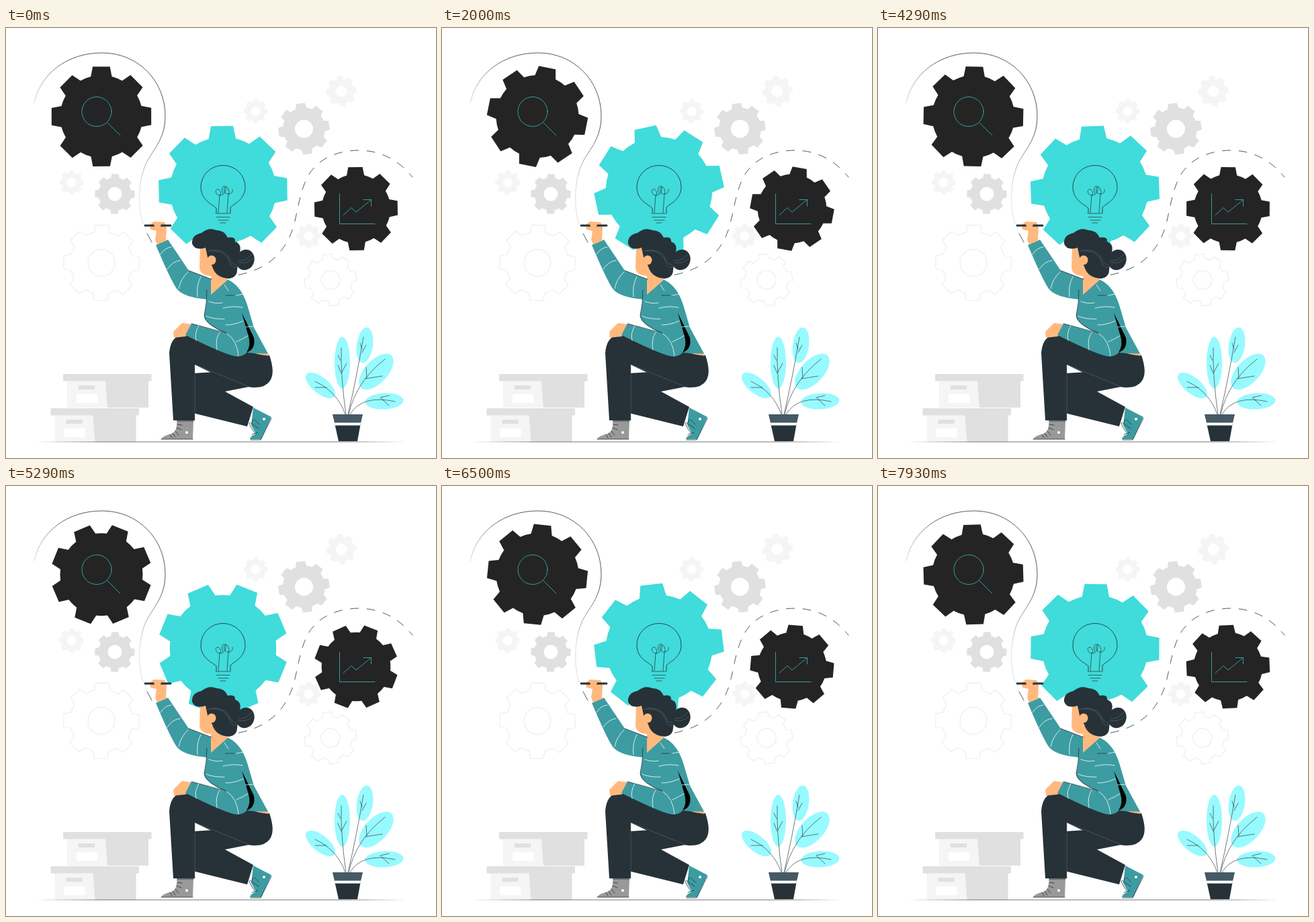
These frames come from a looping animation (640x640 px, 8 s). An HTML page:

```html
<!DOCTYPE html>
<html lang="en">
<head>
<meta charset="utf-8">
<title>Turning gears</title>
<style>
  html, body { margin: 0; width: 100%; height: 100%; overflow: hidden; background: #fff; }
  svg { display: block; width: 100%; height: 100%; }
  .line { fill: none; stroke: #263238; stroke-width: .8; stroke-linecap: round; stroke-linejoin: round; }
  .thin { stroke-width: .65; }
  .cyan { stroke: #40dbdb; }
  .white { stroke: #fff; }
  .dark { fill: #263238; }
  .shirt { fill: #3c9ca2; }
  .skin { fill: #ffb97f; }
  .pale { fill: #f5f5f5; }
  .grey { fill: #e0e0e0; }
  .leaf { fill: #97faff; }
</style>
</head>
<body>
<svg viewBox="0 0 640 640">
  <defs>
    <linearGradient id="fade" gradientUnits="userSpaceOnUse" x1="42" y1="112" x2="95" y2="45">
      <stop offset="0" stop-color="#263238" stop-opacity=".2"/>
      <stop offset="1" stop-color="#263238"/>
    </linearGradient>
  </defs>
  <g id="backGears"></g>
  <g id="gears"></g>

  <!-- icons -->
  <g class="line thin cyan">
    <circle cx="135" cy="124.500" r="22"/>
    <path d="M151 141L170 160M496.500 247V291.500H549M502 278.500L514 267.500L521 274L543 256M532 255.500H543.500V265"/>
  </g>
  <g class="line" style="stroke:#242424">
    <path d="M313 275V268C306 262 290 256 290 236.500A33 32 0 0 1 356 236.500C356 255 340 261 334 267V275"/>
    <path class="thin" d="M312 276H334M313 281.500H333M316 286H331M319 290H327"/>
    <path class="thin" d="M316 275L318 249C311 248 311 240 315 240C320 240 321 249 318 249C325 249 328 243 327 237C324 232 319 239 323 246M329 275L331 247C324 248 323 237 327 236C332 237 333 247 331 247C336 247 338 243 337 240"/>
  </g>

  <!-- drawn path -->
  <path class="line" style="stroke:url(#fade)" d="M42 112C51 67 92 37 143 37C197 37 237 79 237 131C237 168 216 183 207 205C197 230 196 267 204 292"/>
  <path class="line" d="M210 306L217 319"/>
  <path class="line" stroke-dasharray="12 12.500" stroke-dashoffset="5" d="M605 222C584 196 558 183 527 182C495 182 465 193 449 221C437 245 435 269 428 295C414 341 382 361 343 368"/>

  <!-- boxes -->
  <g id="boxes"></g>
  <path d="M43 616L140 615.400H500L597 616L500 616.600H140Z" fill="#777"/>

  <!-- plant -->
  <g class="leaf">
    <ellipse cx="500.500" cy="498" rx="11.500" ry="38.500"/>
    <ellipse cx="534" cy="472" rx="12" ry="26.500" transform="rotate(8 534 472)"/>
    <ellipse cx="551" cy="511.500" rx="17" ry="33" transform="rotate(43 551 511.500)"/>
    <ellipse cx="468" cy="532" rx="12" ry="26.500" transform="rotate(-51 468 532)"/>
    <ellipse cx="563" cy="555.500" rx="28.500" ry="12" transform="rotate(-3 563 555.500)"/>
  </g>
  <g class="line thin">
    <path d="M506 575Q498 520 499 476M499 514L494 502M500 512L507 499M498 495L494 487"/>
    <path d="M509 575Q521 525 532 460M530 483L536 472M530 478L527 469"/>
    <path d="M510 575Q521 526 564 493M537 521L536 505M535 522L560 518"/>
    <path d="M505 575Q493 541 460 526M477 535L460 535"/>
    <path d="M512 575Q530 545 579 556M557 550L570 547M558 551L570 562"/>
  </g>
  <path class="dark" d="M489 588H528L523 615H495Z"/>
  <path d="M486 575H531L528 588H489Z" fill="#455a64"/>
  <path d="M489 587.500H528L527.500 591.500H489.500Z" fill="#fff"/>

  <!-- shoes -->
  <path d="M254 584H279L278 612H231Q233 607 246 604Q256 600 254 584Z" fill="#999"/>
  <path class="line" d="M231 612H278M255 585H279M248 603L252 609M252 600L257 606M254 595L261 598M255 590L262 591M244 605L247 610"/>
  <path class="shirt" d="M368 565L395 579L380 612H363Q364 607 372 604L365 591Z"/>
  <path class="line" d="M364 613H379L395 581M366 588L368 583M371 604Q364 594 362 588M376 596L363 587M375 602L366 605M377 590L370 583"/>
  <g fill="#fff"><circle cx="269" cy="602" r="2"/><circle cx="384" cy="582" r="2"/></g>

  <!-- legs -->
  <path class="dark" d="M278 514L309 512L367 533L326 541L368 564L359 593L278 573Z"/>
  <path class="dark" d="M249 584L243 484Q245 456 268 456L330 470L392 487Q401 513 393 525Q386 536 367 535Q345 533 281 501V584Z"/>
  <path class="line thin" d="M281 584V501L360 533" style="stroke:#607078;stroke-width:.5"/>

  <!-- torso and arms -->
  <path class="skin" d="M366 483L389 483L391 488Q378 487 366 483Z"/>
  <path class="shirt" d="M305 372L331 375Q350 384 359 412L369 446L390 484.500Q373 485 358 483L328 455Q294 440 295 428Q299 411 299 391Z"/>
  <path class="shirt" d="M223 323L241 315L272 361L306 374L300 404Q264 401 254 388Q245 375 223 323Z"/>
  <path class="skin" d="M305 345L320 370L331 374L305 397Z"/>
  <path class="skin" d="M268 459L250 461L249 452L262 439L276 441Z"/>
  <path class="shirt" d="M321 404Q328 397 340 399Q351 411 354 437L362 470Q362 488 344 489Q329 488 267 457L276 440L329 455Q323 437 321 404Z"/>
  <path d="M351 424L369 461Q372 478 358 483Q365 472 361 459Z"/>
  <path class="line" d="M272 361L306 374M299 390Q299 410 295 428Q297 442 328 454L276 440M327 398H339"/>
  <g class="line white">
    <path d="M230 337Q236 327 246 326M240 359Q248 347 259 346M257 388Q260 373 271 363M285 400Q283 383 290 370"/>
    <path d="M302 407Q312 411 322 409M298 429Q311 434 325 433M325 382L331 391M343 398L353 396M323 417Q338 413 352 416M327 442Q340 442 353 436M357 445L368 444M283 465Q280 455 287 443M314 479Q311 463 318 453M329 455Q344 465 346 488M343 467Q354 462 360 458"/>
  </g>

  <!-- raised hand with pen -->
  <path class="skin" d="M214 293L220 288L236 289L239 297L238 315L240 316L225 322L222 315L224 302L215 300Z"/>
  <path d="M207 294H245" class="line" style="stroke-width:2.800"/>
  <path class="skin" d="M220 292Q227 288 231 293L229 297L222 299Z"/>

  <!-- head -->
  <path class="skin" d="M289 323L288 357Q289 368 304 369L320 365L316 326Z"/>
  <path class="dark" d="M277 321Q276 308 291 305Q302 296 313 301Q325 301 330 312Q342 310 341 318Q351 321 348 334L344 360Q344 371 332 373Q312 372 307 355L300 341L297 327Q281 332 277 321Z"/>
  <ellipse class="dark" cx="356" cy="345" rx="13.500" ry="15.500" transform="rotate(18 356 345)"/>
  <ellipse class="skin" cx="306" cy="345.500" rx="6.500" ry="7"/>
  <path class="line thin" style="stroke:#56666e" d="M300 332Q322 326 332 342Q336 353 343 352M304 332Q328 330 334 351Q338 359 344 355M346 346Q356 348 366 337M346 349Q358 352 367 343"/>
</svg>
<script>
const NS = 'http://www.w3.org/2000/svg';
const LOOP = 8000, FPS = 14;

function add(parent, tag, attrs) {
  const node = document.createElementNS(NS, tag);
  for (const name in attrs) node.setAttribute(name, attrs[name]);
  return document.getElementById(parent).appendChild(node);
}

// Eight tapered teeth around a round body, centred on 0,0.
function gearPath(r, hole = 0) {
  const tip = [.17, .985], base = [.208, .79];
  const body = r * Math.hypot(...base);
  const profile = [[-base[0], -base[1]], [-tip[0], -tip[1]], [tip[0], -tip[1]], [base[0], -base[1]]];
  let d = '';
  for (let i = 0; i < 8; i++) {
    const c = Math.cos(i * Math.PI / 4), s = Math.sin(i * Math.PI / 4);
    profile.forEach(([x, y], j) => {
      const point = [(x * c - y * s) * r, (x * s + y * c) * r].map(v => v.toFixed(2));
      d += (j ? 'L' : i ? `A${body} ${body} 0 0 1 ` : 'M') + point;
    });
  }
  d += `A${body} ${body} 0 0 1 ${-base[0] * r} ${-base[1] * r}Z`;
  if (hole) d += `M${hole} 0A${hole} ${hole} 0 1 0 ${-hole} 0A${hole} ${hole} 0 1 0 ${hole} 0Z`;
  return d;
}

const place = (x, y, angle) => `translate(${x} ${y}) rotate(${angle})`;

// x, y, radius, hole, angle, fill
[
  [443.5, 150, 38.5, 13.5, -8, '#e0e0e0'],
  [162, 247, 30, 10.5, 1, '#e0e0e0'],
  [499, 94, 23, 8.5, -6, '#f5f5f5'],
  [371.5, 124, 18, 7, 1, '#f5f5f5'],
  [97.5, 230, 18.5, 7, 1, '#f5f5f5'],
  [450.5, 309.5, 18.5, 7, 1, '#f5f5f5'],
  [142, 349.5, 57, 20, 1, 'none'],
  [483, 375, 39, 14, -8, 'none']
].forEach(([x, y, r, hole, angle, fill]) => add('backGears', 'path', {
  d: gearPath(r, hole), transform: place(x, y, angle), fill,
  'fill-rule': 'evenodd', stroke: fill === 'none' ? '#ebebeb' : 'none'
}));

const gears = [
  { x: 142, y: 131.7, r: 75.3, start: -.1, turn: 1, fill: '#242424' },
  { x: 323, y: 241.5, r: 97, start: -.9, turn: -1, fill: '#40dbdb' },
  { x: 521, y: 269, r: 62.8, start: -1, turn: 1, fill: '#242424' }
];
for (const gear of gears) gear.node = add('gears', 'path', { d: gearPath(gear.r), fill: gear.fill });

for (const [x, y] of [[85, 515], [66.5, 566]]) {
  const rect = (cls, dx, dy, width, height) =>
    add('boxes', 'rect', { class: cls, x: x + dx, y: y + dy, width, height });
  rect('pale', 6, 10, 66, 40);
  add('boxes', 'path', { class: 'grey', d: `M${x + 63} ${y + 10}H${x + 127}V${y + 50}H${x + 66}Z` });
  rect('grey', 0, 0, 131.5, 10.5);
  rect('grey', 23, 17, 24, 6);
  rect('', 20, 30, 31, 13).setAttribute('fill', '#fff');
}

// Degrees turned after t seconds: a slow start that gathers speed.
const turned = t => .53 * t + 2.79 * t * t - .0925 * t ** 3;

function draw(now) {
  const step = Math.floor((now % LOOP + 5) * FPS / 1000);
  const angle = turned(step / FPS);
  for (const g of gears) g.node.setAttribute('transform', place(g.x, g.y, g.start + g.turn * angle));
}

const begin = performance.now();
function tick() {
  draw(performance.now() - begin);
  requestAnimationFrame(tick);
}
tick();
</script>
</body>
</html>
```
